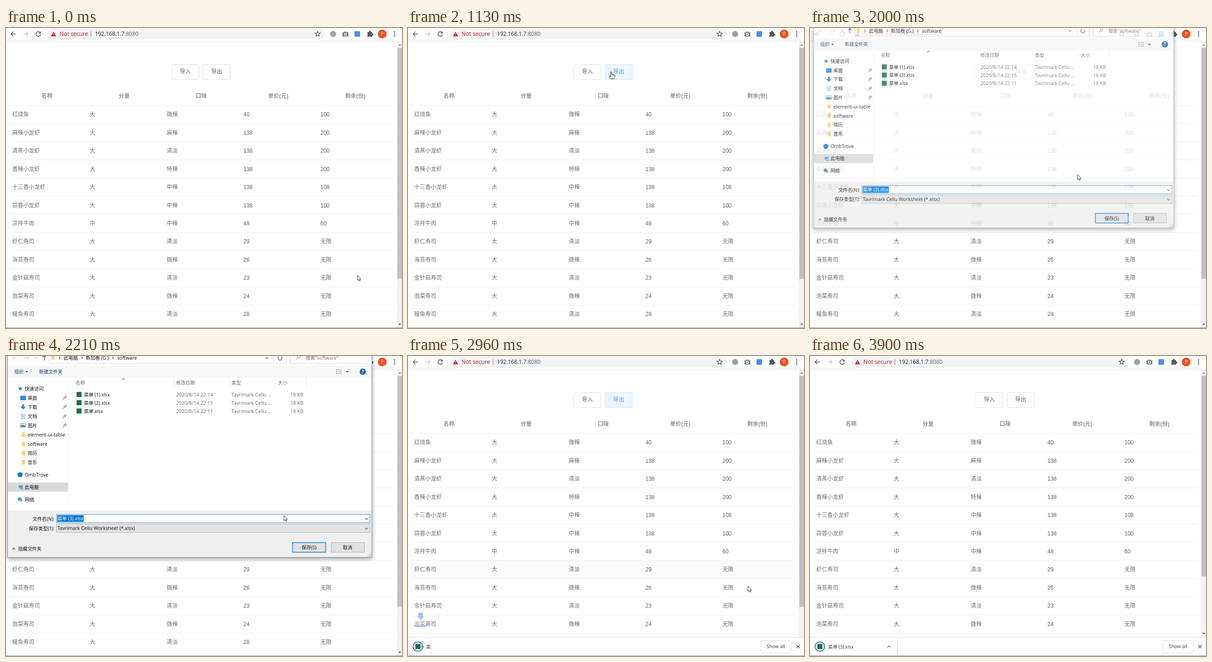
Recreate the animation shown at these times as an HTML page. Size 859 by 652 pixels, loop 3970 ms.

```html
<!DOCTYPE html>
<html lang="zh-CN">
<head>
<meta charset="utf-8">
<style>
  html, body { margin: 0; width: 100%; height: 100%; overflow: hidden; background: #fff; }
  svg { display: block; }
  text { font-family: "Open Sans", "Noto Sans CJK SC", "Noto Sans CJK JP", sans-serif; white-space: pre; }
  .table text { font-family: "Liberation Sans", "Noto Sans CJK SC", "Noto Sans CJK JP", sans-serif; }
</style>
</head>
<body>
<svg id="stage" width="859" height="652" viewBox="0 0 859 652"></svg>
<script>
const LOOP = 3970, ROW = 39.45, TOP = 168;
const hasHan = s => /[\u4e00-\u9fff]/.test(s);

// y is the vertical middle of the line of text
const text = (x, y, s, size = hasHan(s) ? 10.3 : 10.6, fill = '#111', more = '') =>
  `<text x="${x}" y="${y + size * .36}" font-size="${size}" fill="${fill}" ${more}>${s}</text>`;
const rect = (x, y, w, h, fill, more = '') =>
  `<rect x="${x}" y="${y}" width="${w}" height="${h}" fill="${fill}" ${more}/>`;
const path = (d, stroke, width = 1, fill = 'none', more = '') =>
  `<path d="${d}" stroke="${stroke}" stroke-width="${width}" fill="${fill}" ${more}/>`;
const shape = (d, fill, more = '') => path(d, 'none', 0, fill, more);
const circle = (x, y, r, fill, more = '') => `<circle cx="${x}" cy="${y}" r="${r}" fill="${fill}" ${more}/>`;
const at = (x, y, s, more = '') => `<g transform="translate(${x} ${y})" ${more}>${s}</g>`;
const chevron = (x, y, dir, color = '#555', r = 3) => at(x, y,
  path(`M${-r} ${-r / 2}L0 ${r / 2}L${r} ${-r / 2}`, color, 1.1, 'none', `transform="rotate(${dir})"`));
const starPath = r => 'M' + Array.from({ length: 10 }, (_, i) => {
  const a = i * Math.PI / 5, k = i % 2 ? r * .45 : r;
  return `${(k * Math.sin(a)).toFixed(2)} ${(-k * Math.cos(a)).toFixed(2)}`;
}).join('L') + 'Z';

function toolbar() {
  const back = 'M5 0H-5M0-5L-5 0L0 5';
  return rect(0, 0, 859, 28, '#fff') + rect(0, 28, 859, 1, '#dfe1e4') +
    rect(89, 1, 602, 24, '#f1f3f4', 'rx="12"') +
    at(16, 13, path(back, '#54585d', 1.5)) +
    at(43, 13, path(back, '#c3c5c8', 1.5, 'none', 'transform="scale(-1 1)"')) +
    at(70, 13, path('M4 -3A5 5 0 1 0 5 1', '#54585d', 1.5) + shape('M5.5-6V-1H.5Z', '#54585d')) +
    shape('M103 8L108.5 18H97.5Z', '#c5221f') + rect(102.5, 11, 1, 3.5, '#fff') + rect(102.5, 15.5, 1, 1, '#fff') +
    text(116, 13, 'Not secure', 12.3, '#c5221f') + rect(184, 7, 1, 13, '#85888c') +
    text(193, 13, '192.168.1.7<tspan fill="#5f6368">:8080</tspan>', 11.9, '#202124') +
    at(676, 13, path(starPath(6), '#54585d', 1.2)) +
    circle(709.5, 13, 6, '#98a5a0', 'stroke="#8b9691"') +
    shape('M730 9.5H733L734 8H738.5L739.5 9.5H742.5V18.5H730Z', '#777') +
    circle(736.2, 13.8, 3.2, '#fff') + circle(736.2, 13.8, 1.8, '#777') +
    rect(756, 7, 12, 12, '#4c8bf0') +
    shape('M784 9H787.5A2 2 0 1 1 791 9H794V12.5A2 2 0 1 1 794 16V19H790.5A1.7 1.7 0 0 0 787.5 19H784V15.5A1.7 1.7 0 0 0 784 12.5Z', '#54585d') +
    circle(816, 13, 9.5, '#f4511e') + text(816, 13, 'P', 10, '#fff', 'text-anchor="middle"') +
    [8.5, 13, 17.5].map(y => circle(843, y, 1.4, '#54585d')).join('');
}

const menu = `红烧鱼 大 微辣 40 100|麻辣小龙虾 大 麻辣 138 200|清蒸小龙虾 大 清淡 138 200|香辣小龙虾 大 特辣 138 200
|十三香小龙虾 大 中辣 138 108|蒜蓉小龙虾 大 中辣 138 100|凉拌牛肉 中 中辣 48 60|虾仁寿司 大 清淡 29 无限
|海苔寿司 大 微辣 26 无限|金针菇寿司 大 清淡 23 无限|泡菜寿司 大 微辣 24 无限|鳗鱼寿司 大 清淡 28 无限`
  .split('|').map(r => r.trim().split(' '));

function table() {
  const heads = ['名称', '分量', '口味', '单价(元)', '剩余(份)'];
  const button = (x, s, id) => `<g id="${id}">` +
    rect(x + .5, 79.5, 59, 32.5, '#fff', 'stroke="#dcdfe6" rx="3"') +
    text(x + 30, 95, s, 12, '#606266', 'text-anchor="middle" font-weight="300"') + '</g>';
  return rect(5, TOP + 7 * ROW, 836, ROW, '#f5f7fa', 'id="hover" opacity="0"') +
    button(359, '导入', 'importBtn') + button(427, '导出', 'exportBtn') +
    heads.map((s, i) => text(89 + 167.2 * i, 148, s, 12, '#909399', 'text-anchor="middle" font-weight="700"')).join('') +
    menu.map((cells, r) => cells.map((s, c) =>
      text([13.5, 181.5, 348.5, 515, 682][c], 188 + ROW * r, s, 12, hasHan(s) ? '#6c6e72' : '#606266',
        hasHan(s) ? 'font-weight="300"' : '')).join('')).join('') +
    Array.from({ length: 13 }, (_, i) => rect(5, Math.round(TOP - .3 + ROW * i), 836, 1, '#ebeef5')).join('');
}

function scrollbar() {
  return rect(848, 29, 11, 622, '#f1f1f1') + rect(849, 43, 10, 502, '#c1c1c1', 'id="thumb"') +
    shape('M851 38.5H857L854 35Z', '#8a8a8a') +
    shape('M851 -1.5H857L854 2Z', '#505050', 'id="scrollDown"');
}

function dialog() {
  const folder = rect(-4, -5, 8, 10, '#f7d377') + rect(-4, -5, 3, 10, '#fbe3a1');
  const sheet = rect(-4, -5, 8, 10, '#fff', 'stroke="#7c98ad"') + path('M-2-2H2M-2 0H2M-2 2H2', '#4f9bd0');
  const monitor = rect(-4, -4, 8, 6, '#3f9fe0') + path('M-1 4H5', '#6a7f90', 1.5);
  const places = [
    [31, 71, '快速访问', shape(starPath(5.5), '#2a8fdf')],
    [37, 91, '桌面', rect(-6, -4.5, 12, 8, '#1f8fe6') + rect(-6, 3.5, 12, 1.5, '#0c66ad')],
    [37, 111, '下载', shape('M-2-6H2V-1H6L0 5.5L-6-1H-2Z', '#2b88d0')],
    [37, 131, '文档', sheet],
    [37, 151, '图片', rect(-6, -4, 12, 8, '#dbe9f2', 'stroke="#8ba0ae"') + shape('M-5 3V0L0-1L5 1V3Z', '#3a7d9c')],
    [37, 171, 'element-ui-table', folder], [37, 191, 'software', folder],
    [37, 211, '简历', folder], [37, 231, '音乐', folder],
    [30.5, 258, 'OmbTrove', circle(0, 0, 5.5, '#0f78d0')],
    [32, 285, '此电脑', monitor],
    [30.5, 312, '网络', circle(-1, -1, 4, '#4f95c9') + rect(0, -1, 5, 5, '#7aa7c4')]
  ];
  const pin = path('M-4 4L-1 1M-2-2L2 2M-1-1L2-4L4-2L1 1', '#8b9298', 1.5);
  const files = [['菜单 (1).xlsx', 14], ['菜单 (2).xlsx', 15], ['菜单.xlsx', 11]];
  const box = (x, y, w, h, fill, stroke, more = '') =>
    rect(x + .5, y + .5, w - 1, h - 1, fill, `stroke="${stroke}" ${more}`);
  const gray = '#5d6670';
  return rect(3.5, -30.5, 790, 468, '#fff', 'filter="url(#shadow)" stroke="#8c8c8c"') +
    rect(4, 21, 789, 26.5, '#f5f7f9') + rect(4, 336, 789, 101, '#efefef') +
    rect(135, 48, 1, 288, '#ededed') +
    // address row
    at(19, 4, path('M5 0H-5M-1-4L-5 0L-1 4', '#c8c8c8')) + at(45, 4, path('M-5 0H5M1-4L5 0L1 4', '#c8c8c8')) +
    chevron(66, 4, 0, '#c8c8c8', 2) + at(83, 4, path('M0 6V-5M-4-1L0-5L4-1', '#444', 1.3)) +
    box(93, -10, 516, 27, '#fff', '#d9d9d9') + rect(580, -10, 1, 26, '#d9d9d9') +
    at(101, 3, folder) + [116, 165, 232].map(x => chevron(x, 4, -90, '#444', 2.5)).join('') +
    text(125, 4, '此电脑') + text(173, 4, '新加卷 (G:)') + text(241, 4, 'software') +
    chevron(566, 4, 0) + path('M597.5 1.5A4.5 4.5 0 1 1 592 .5', '#555', 1.2) +
    box(616, -10, 170, 27, '#fff', '#d9d9d9') + circle(635, 2, 3, 'none', 'stroke="#777"') + path('M633 4L629 8', '#777') +
    text(650, 4, '搜索"software"', 10.4, '#6d6d6d') +
    // command row
    text(18, 34, '组织', 10.3, '#1e395b') + shape('M42 33H48L45 36Z', '#444') +
    text(72, 34, '新建文件夹', 10.1, '#1e395b') +
    [30, 34, 38].map(y => rect(716, y - 1, 3, 2, '#8aa0b0') + rect(721, y - 1, 3, 2, '#aaa') + rect(725, y - 1, 3, 2, '#aaa')).join('') +
    shape('M737 33H743L740 36Z', '#444') +
    circle(774, 34, 6.8, '#1769b5') + text(774, 34, '?', 10, '#fff', 'text-anchor="middle" font-weight="700"') +
    // file list
    [364, 484, 584, 651].map(x => rect(x, 48, 1, 21, '#e8e8e8')).join('') + chevron(255, 50, 180, '#777', 3) +
    [[151, '名称'], [369, '修改日期'], [489, '类型'], [590, '大小']].map(([x, s]) => text(x, 58.5, s, 10.2, gray)).join('') +
    files.map(([name, min], i) => {
      const y = 84 + 18 * i;
      return rect(153, y - 6, 11, 11, '#1e7145') + text(169, y, name) +
        text(369, y, `2020/8/14 22:${min}`, 10.6, '#6d6d6d') + text(489, y, 'Tavrimark Cellu ...', 10.6, '#6d6d6d') +
        text(645, y, '18 KB', 10.6, '#6d6d6d', 'text-anchor="end"');
    }).join('') +
    // places
    rect(4, 275, 130, 20, '#d9d9d9') +
    places.map(([x, y, s, icon], i) => at(x, y, icon) + text(i && i < 9 ? 47 : 40.5, y, s) +
      (i && i < 5 ? at(127, y, pin) : '')).join('') +
    // fields and buttons
    text(105, 354, '文件名(N):', 10.3, '#111', 'text-anchor="end"') +
    text(105, 375, '保存类型(T):', 10.3, '#111', 'text-anchor="end"') +
    box(109, 344, 681, 19, '#fff', '#3f93d6') + rect(111, 346, 57.5, 14.5, '#0078d7') +
    text(111.5, 353.5, '菜单 (3).xlsx', 10.3, '#fff') +
    box(109, 365, 681, 19, '#e3e3e3', '#b5b5b5') + text(111.5, 374.5, 'Tavrimark Cellu Worksheet (*.xlsx)') +
    chevron(782, 354, 0) + chevron(782, 375, 0) +
    chevron(17, 419, 180, '#333') + text(26.5, 419, '隐藏文件夹', 10.1) +
    box(621, 405, 73, 22, '#e1e1e1', '#0078d7', 'id="save" stroke-width="1.4"') +
    text(657.5, 416.5, '保存(S)', 10.3, '#111', 'text-anchor="middle"') +
    box(705, 405, 73, 22, '#e1e1e1', '#adadad') + text(741, 416.5, '取消', 10.3, '#111', 'text-anchor="middle"') +
    [[0, 0], [3, 0], [6, 0], [3, -3], [6, -3], [6, -6]].map(([x, y]) => rect(784 + x, 434 + y, 2, 2, '#b8b8b8')).join('');
}

function downloads() {
  const arrow = rect(13, -13, 28, 46, '#fff', 'opacity=".6" rx="6"') +
    shape('M22.5 0H32V7.5H35.5L27.5 16L19.5 7.5H22.5Z', '#4285f4') + path('M14 25V29H40V25', '#4285f4', 2.5);
  return `<g id="arrow">${arrow}</g><g id="bar">` + rect(0, 611, 859, 41, '#fff') + rect(0, 611, 859, 1, '#dadce0') +
    circle(21.5, 631.5, 10.3, '#eef4fd', 'stroke="#2a6fdd" stroke-width="1.8"') + rect(16, 626, 11, 11, '#1e7145') +
    `<g clip-path="url(#itemClip)">${text(39, 632.5, '菜单 (3).xlsx', 10.2, '#3c4043')}</g>` +
    `<g id="itemEnd">${rect(-1, 617, 1, 30, '#d2d4d8')}${chevron(-19, 631.5, 180, '#54585d', 3.5)}</g>` +
    rect(765.5, 618.5, 66, 26, '#fff', 'rx="3" stroke="#dadce0"') + text(798, 631.5, 'Show all', 10.4, '#3c4043', 'text-anchor="middle"') +
    path('M842.5 628L849.5 635M849.5 628L842.5 635', '#54585d', 1.4) + '</g>';
}

function pointers() {
  return '<g id="pointer">' +
    `<g id="plain">${path('M.5 .5V11.7L3 9.4L4.8 13.2L6.5 12.4L4.8 8.8H8Z', '#222', .9, '#fff')}</g>` +
    `<g id="busy">${circle(9.5, 1, 3.9, '#fff', 'stroke="#1c8fe3" stroke-width="2.8"')}</g>` +
    `<g id="hand">${path('M-1.2 9V1Q0-.8 1.2 1V6L7.5 7.5V12L6 15.5H-1.5L-5 10.5Q-4.5 8.5-2.8 9.5L-1.2 11Z', '#222', 1, '#fff')}${
      path('M3.3 6.5V8.5M5.4 7V9', '#222', .8)}</g></g>`;
}

const stage = document.getElementById('stage');
stage.innerHTML = `<defs>
  <filter id="shadow" x="-5%" y="-5%" width="110%" height="112%"><feDropShadow dx="0" dy="3" stdDeviation="5" flood-opacity=".4"/></filter>
  <clipPath id="itemClip"><rect id="itemMask" y="612" width="0" height="40"/></clipPath></defs>` +
  `<g class="table">${table()}</g>` + scrollbar() + toolbar() + downloads() +
  rect(0, 651, 859, 1, '#8f9193') + `<g id="dialog">${dialog()}</g>` + pointers();

const $ = id => document.getElementById(id);
const set = (el, attrs) => { for (const k in attrs) el.setAttribute(k, attrs[k]); };
const show = (id, on) => set($(id), { visibility: on ? 'visible' : 'hidden' });
const ramp = (t, from, to) => Math.min(1, Math.max(0, (t - from) / (to - from)));
const mix = (a, b, p) => `rgb(${a.map((v, i) => Math.round(v + (b[i] - v) * p))})`;

// [time, x, y] stops of the pointer tip
const trail = [[60, 762, 537], [570, 445, 96], [640, 445, 96], [690, 441, 95], [1300, 441, 95], [1640, 515, 169],
  [1700, 515, 169], [2000, 580, 318], [2590, 657, 415], [2780, 657, 415], [2960, 737, 500], [3220, 776, 582],
  [3500, 806, 628], [3780, 806, 630], [3860, 812, 665]];

function pointerAt(t) {
  const i = trail.findIndex(k => k[0] > t);
  if (i < 1) return (i ? trail[trail.length - 1] : trail[0]).slice(1);
  const [a, b] = [trail[i - 1], trail[i]];
  const p = ramp(t, a[0], b[0]), e = p * p * (3 - 2 * p);
  return [a[1] + (b[1] - a[1]) * e, a[2] + (b[2] - a[2]) * e];
}

function draw(t) {
  const [x, y] = pointerAt(t);
  const onButton = t > 500 && t < 1430;
  set($('pointer'), { transform: `translate(${x.toFixed(1)} ${y.toFixed(1)})` });
  show('plain', !onButton);
  show('hand', onButton);
  show('busy', t >= 1430 && t < 1850);

  const hot = ramp(t, 525, 625) - ramp(t, 3760, 3860);
  const [face, label] = $('exportBtn').children;
  set(face, { fill: mix([255, 255, 255], [236, 245, 255], hot), stroke: mix([220, 223, 230], [198, 226, 255], hot) });
  set(label, { fill: mix([96, 98, 102], [64, 158, 255], hot) });
  set($('hover'), { opacity: .45 * (ramp(t, 2850, 2930) - ramp(t, 2960, 3090)) });

  const open = ramp(t, 1840, 2040), close = ramp(t, 2820, 2940);
  const scale = 1 - .1 * (1 - open) ** 1.35 - .1 * close;
  set($('dialog'), { opacity: open * (1 - close),
    transform: `translate(399 175) scale(${scale}) translate(-399 -175)` });
  const over = t > 2530;
  set($('save'), { fill: over ? '#cce4f7' : '#e1e1e1', stroke: over ? '#005499' : '#0078d7' });

  const fly = ramp(t, 2880, 3480);
  set($('arrow'), { opacity: 1 - 4 * (fly - .5) ** 2, transform: `translate(0 ${553 + 37 * fly})` });
  show('bar', t >= 2830);
  set($('bar'), { transform: `translate(0 ${41 * (1 - ramp(t, 2830, 2950))})` });
  const width = 190 * (1 - (1 - ramp(t, 2883, 3683)) ** 3);
  set($('itemMask'), { width });
  set($('itemEnd'), { transform: `translate(${width} 0)` });

  const resized = t >= 3780;
  set($('thumb'), { height: resized ? 436 : 502 });
  set($('scrollDown'), { transform: `translate(0 ${resized ? 603 : 644})` });
}

const start = performance.now();
function tick() {
  draw((performance.now() - start) % LOOP);
  requestAnimationFrame(tick);
}
tick();
</script>
</body>
</html>
```
